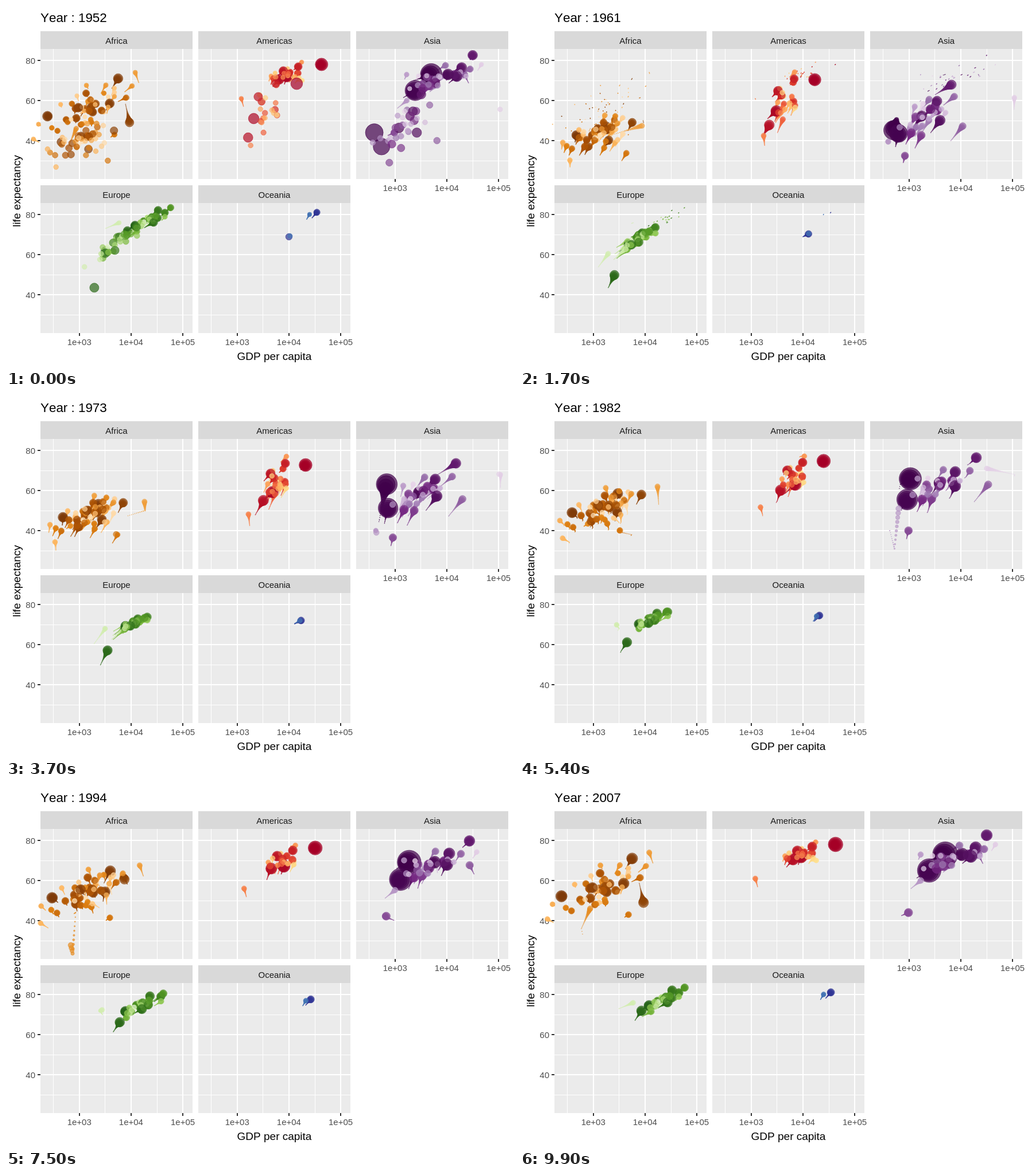
Animation of 885x632 px, one loop 10000 ms. Source, as an HTML page with a canvas:

```html
<!DOCTYPE html>
<html lang="en">
<head>
<meta charset="utf-8">
<title>Life expectancy and GDP</title>
<style>
html, body { margin: 0; width: 885px; height: 632px; overflow: hidden; background: #fff; }
svg, canvas { position: absolute; left: 0; top: 0; }
text { font: 15px "Liberation Sans", Arial, sans-serif; font-kerning: none; fill: #4d4d4d; text-anchor: middle; }
.strip { fill: #1a1a1a; }
.name { font-size: 19px; fill: #000; }
#title { font-size: 22.4px; fill: #000; text-anchor: start; }
</style>
</head>
<body>
<svg id="chart" width="885" height="632" shape-rendering="crispEdges"></svg>
<canvas id="dots" width="885" height="632"></canvas>
<script>
// x is 100 * log10(GDP), y is life expectancy, population is in millions.
// trend: [year, mean x, mean y, spread of x, spread of y]; link ties life expectancy to wealth.
// leads: countries with a path of their own, as points [year, x, y].
const continents = [
  {
    name: 'Africa', left: 60, top: 75, count: 52, biggest: 135, skew: 6, growth: .28, link: .4,
    ramp: ['7f3b08', 'b35806', 'e08214', 'fdb863', 'fee0b6'],
    trend: [[1952, 299, 39, 28, 5], [1972, 317, 47, 34, 6], [1992, 313, 53, 40, 8], [2007, 316, 55, 44, 9]],
    leads: [
      { rank: 1, path: [[1952, 315, 42], [1992, 358, 64], [2007, 375, 71]] },
      { rank: 4, path: [[1952, 367, 45], [1982, 393, 58], [1992, 386, 62], [2007, 397, 49]] },
      { rank: 22, path: [[1952, 355, 30], [1972, 374, 38], [1977, 348, 39.5], [2007, 368, 43]] },
      { rank: 28, path: [[1952, 269, 40], [1987, 293, 44], [1992, 287, 23.6], [1997, 277, 36], [2007, 294, 46]] },
      { rank: 32, path: [[1952, 338, 43], [1967, 427, 50], [1982, 424, 62], [2007, 408, 74]] }
    ]
  },
  {
    name: 'Americas', left: 335, top: 75, count: 25, biggest: 301, skew: 9, growth: .5, link: .6,
    ramp: ['a50026', 'd73027', 'f46d43', 'fdae61', 'fee090'],
    trend: [[1952, 347, 52, 22, 9], [1972, 368, 62, 20, 7], [1992, 378, 69, 23, 4], [2007, 390, 73, 23, 3]],
    leads: [
      { rank: 0, path: [[1952, 415, 68.4], [1982, 440, 74.7], [2007, 463, 78]] },
      { rank: 1, path: [[1952, 332, 51], [1982, 385, 63], [2007, 396, 72]] },
      { rank: 14, path: [[1952, 326, 37.6], [1972, 322, 48], [2007, 308, 61]] },
      { rank: 24, path: [[1952, 348, 59], [1982, 396, 69], [2007, 426, 70]] }
    ]
  },
  {
    name: 'Asia', left: 610, top: 75, count: 33, biggest: 250, skew: 4, growth: .4, link: .75,
    ramp: ['40004b', '762a83', '9970ab', 'c2a5cf', 'e7d4e8'],
    trend: [[1952, 318, 47, 33, 9], [1972, 347, 58, 44, 8], [1992, 363, 67, 45, 6], [2007, 382, 71, 47, 5]],
    leads: [
      { rank: 0, pop: 1319, path: [[1952, 260, 44], [1957, 276, 50.5], [1962, 269, 44.5], [1972, 283, 63], [1992, 322, 68.7], [2007, 370, 73]] },
      { rank: 1, pop: 1110, path: [[1952, 274, 37], [1972, 286, 51], [1992, 307, 60], [2007, 339, 65]] },
      { rank: 5, path: [[1952, 351, 63], [1972, 417, 73.4], [1992, 443, 79.4], [2007, 450, 82.6]] },
      { rank: 12, path: [[1952, 289, 29], [1982, 299, 40], [1992, 281, 42], [2007, 299, 44]] },
      { rank: 14, path: [[1952, 381, 40], [1982, 453, 63], [2007, 434, 73]] },
      { rank: 22, path: [[1952, 257, 39], [1972, 263, 40], [1977, 272, 31], [1982, 280, 51], [2007, 323, 60]] },
      { rank: 31, path: [[1952, 503, 55.6], [1972, 504, 68], [1982, 450, 71], [2007, 467, 78]] }
    ]
  },
  {
    name: 'Europe', left: 60, top: 344.4, count: 30, biggest: 85, skew: 4, growth: .78, link: .85,
    ramp: ['276419', '4d9221', '7fbc41', 'b8e186', 'e6f5d0'],
    trend: [[1952, 374, 66, 20, 4], [1972, 407, 71, 14, 1.6], [1992, 420, 74.6, 24, 3], [2007, 437, 77.6, 20, 2.7]],
    leads: [
      { rank: 1, path: [[1952, 329, 43.6], [1972, 354, 57], [2007, 393, 72]] },
      { rank: 26, path: [[1952, 310, 54], [1972, 350, 68], [1992, 340, 72], [2007, 377, 76]] }
    ]
  },
  {
    name: 'Oceania', left: 335, top: 344.4, count: 2, biggest: 20, skew: 1, growth: .45, link: 1,
    ramp: ['313695', '4575b4'],
    leads: [
      { rank: 0, path: [[1952, 400, 69], [1972, 423, 72], [2007, 454, 81.2]] },
      { rank: 1, path: [[1952, 402, 69.4], [1972, 421, 72], [2007, 440, 80.2]] }
    ]
  }
];

const FRAMES = 100, WAKE = 20, WIDTH = 265, HEIGHT = 227;
const mix = (a, b, t) => a + (b - a) * t;
const px = (c, x) => c.left + 67.7 + (x / 100 - 3) * 90.2;
const py = (c, y) => c.top + 20 + (80 - y) * 3.5;
const yearAt = frame => 1952 + 55 * frame / (FRAMES - 1);

let seed = 11;
function random() {
  seed = (seed * 16807) % 2147483647;
  return seed / 2147483647;
}
const deviate = () => 2.2 * (random() + random() - 1);

// Interpolates a list of rows that start with their year.
function along(rows, year) {
  const next = Math.max(1, rows.findIndex(row => row[0] >= year - 1e-6));
  const a = rows[next - 1], b = rows[next], t = (year - a[0]) / (b[0] - a[0]);
  return a.slice(1).map((v, i) => mix(v, b[i + 1], t));
}

function rampColor(ramp, t) {
  const at = t * (ramp.length - 1), i = Math.min(Math.floor(at), ramp.length - 2);
  const channel = (hex, k) => parseInt(hex.substr(k, 2), 16);
  return `rgb(${[0, 2, 4].map(k => Math.round(mix(channel(ramp[i], k), channel(ramp[i + 1], k), at - i)))})`;
}

// A standing relative to the continent that drifts from one value to another.
function drift() {
  const from = deviate(), to = .75 * from + .6 * deviate();
  return t => mix(from, to, t);
}

function wanderer({ trend, link }) {
  const wealth = drift(), health = drift(), rest = Math.sqrt(1 - link * link);
  return year => {
    const [x, y, dx, dy] = along(trend, year), t = (year - 1952) / 55;
    return [x + dx * wealth(t), y + dy * (link * wealth(t) + rest * health(t))];
  };
}

function makeTrack(c, rank, position, pop) {
  const share = rank / (c.count - 1);
  pop ??= c.biggest * (1 - share) ** c.skew;
  const spots = Array.from({ length: FRAMES }, (_, frame) => {
    const [x, y] = position(yearAt(frame));
    const people = pop * mix(c.growth, 1, frame / (FRAMES - 1));
    return { x: px(c, x), y: py(c, y), r: 1.778 * (2 + 10 * Math.sqrt(people / 1319)) + .3 };
  });
  return { color: rampColor(c.ramp, share), spots };
}

const tracks = continents.flatMap(c => {
  const list = c.leads.map(({ rank, pop, path }) => makeTrack(c, rank, year => along(path, year), pop));
  for (let i = 0; i < c.count; i++) {
    const rank = i * 7 % c.count;   // mixes large and small countries in drawing order
    if (!c.leads.some(lead => lead.rank === rank)) list.push(makeTrack(c, rank, wanderer(c)));
  }
  return list;
});

function drawPanel(c) {
  const { left, top, name } = c, bottom = top + HEIGHT;
  const line = (x1, y1, x2, y2, color, w) =>
    `<path d="M${x1} ${y1}L${x2} ${y2}" stroke="${color}" stroke-width="${w}"/>`;
  const label = (x, y, s, attrs = '') => `<text x="${x}" y="${y}" ${attrs}>${s}</text>`;
  const column = (x, w) => line(px(c, x), top, px(c, x), bottom, '#fff', w);
  const row = (y, w) => line(left, py(c, y), left + WIDTH, py(c, y), '#fff', w);
  let s = `<rect x="${left}" y="${top}" width="${WIDTH}" height="${HEIGHT}" fill="#ebebeb"/>
    <rect x="${left}" y="${top - 31}" width="${WIDTH}" height="31" fill="#d9d9d9"/>`;
  s += label(left + WIDTH / 2, top - 9, name, 'class="strip"');
  for (const x of [250, 350, 450]) s += column(x, 1);
  for (const y of [30, 50, 70]) s += row(y, 1);
  for (const x of [300, 400, 500]) {
    s += column(x, 2);
    if (top > 75 || left > 600)
      s += line(px(c, x), bottom, px(c, x), bottom + 4.6, '#333', 2) + label(px(c, x), bottom + 21, `1e+0${x / 100}`);
  }
  for (const y of [40, 60, 80]) {
    s += row(y, 2);
    if (left === 60)
      s += line(left - 4.6, py(c, y), left, py(c, y), '#333', 2) + label(51, py(c, y) + 5.5, y, 'style="text-anchor:end"');
  }
  return s;
}

document.getElementById('chart').innerHTML = continents.map(drawPanel).join('') + `
  <text id="title" x="60" y="28"></text>
  <text class="name" x="467.5" y="618">GDP per capita</text>
  <text class="name" transform="translate(25 323) rotate(-90)">life expectancy</text>`;

const ctx = document.getElementById('dots').getContext('2d');
const title = document.getElementById('title');
ctx.globalAlpha = .7;
ctx.lineWidth = .9;

function draw(frame) {
  title.textContent = `Year : ${Math.round(yearAt(frame))}`;
  ctx.clearRect(0, 0, 885, 632);
  for (let age = WAKE; age >= 0; age--) {
    const scale = (1 - age / WAKE) ** 3, past = (frame - age + FRAMES) % FRAMES;
    for (const { color, spots } of tracks) {
      const { x, y, r } = spots[past];
      ctx.fillStyle = ctx.strokeStyle = color;
      ctx.beginPath();
      ctx.arc(x, y, r * scale + .4, 0, 2 * Math.PI);
      ctx.fill();
      ctx.stroke();
    }
  }
}

let shown = -1;
function tick() {
  const frame = Math.floor(performance.now() / 100) % FRAMES;
  if (frame !== shown) draw(shown = frame);
  requestAnimationFrame(tick);
}
tick();
</script>
</body>
</html>
```
